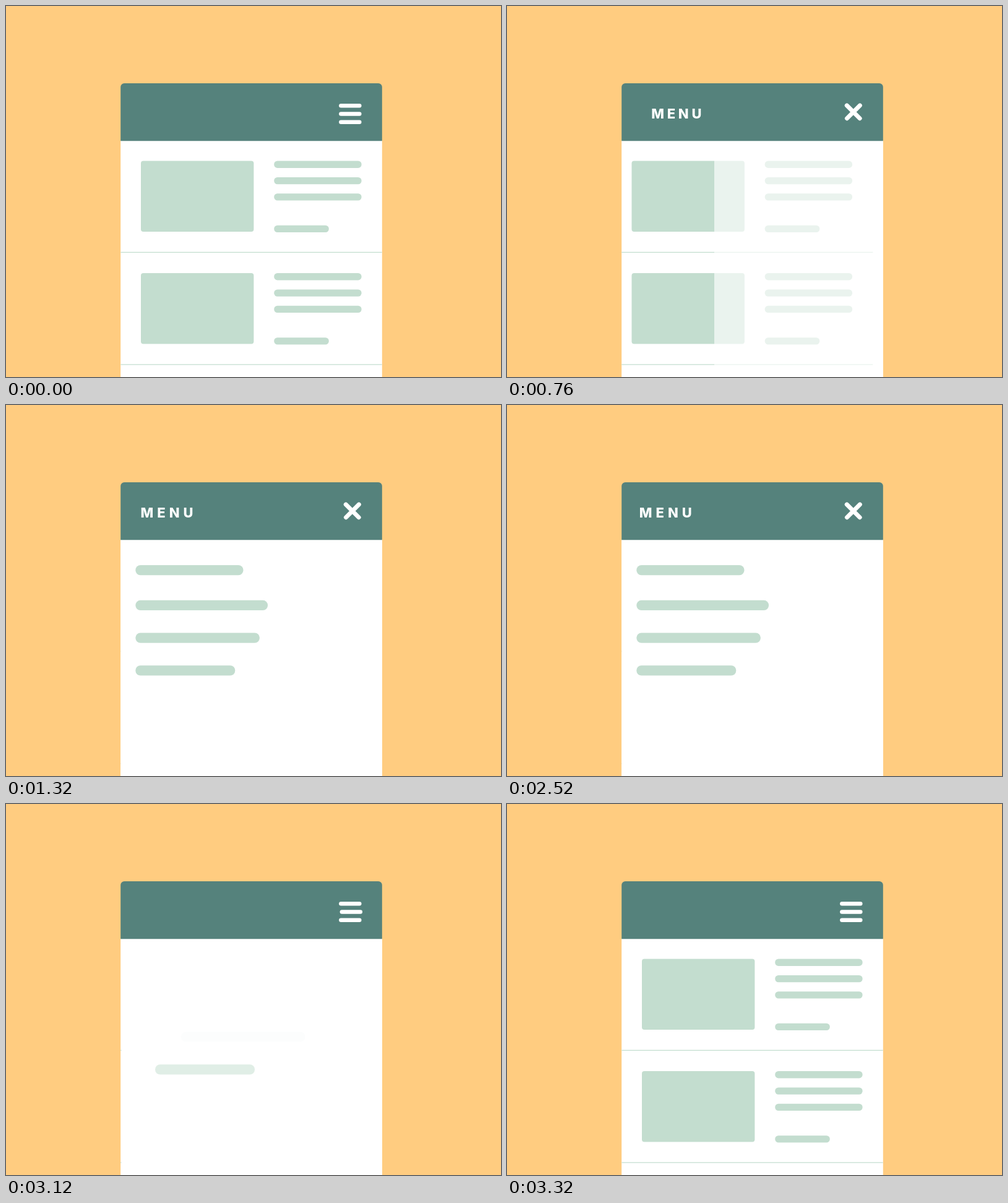
These frames come from a looping animation (800 px wide and 600 px high, 4800 ms). An HTML page with a canvas:

```html
<!DOCTYPE html>
<html lang="en">
<head>
<meta charset="utf-8">
<title>Menu transition</title>
<style>
  html, body { margin: 0; width: 100%; height: 100%; overflow: hidden; background: #ffcc80; }
  canvas { display: block; }
</style>
</head>
<body>
<canvas id="stage" width="800" height="600"></canvas>
<script>
const ctx = document.getElementById('stage').getContext('2d');
const LOOP = 4800, STEP = 40;
const TEAL = '#55827c', MINT = '#c3ddcf', WHITE = '#fff';
const CARD = { x: 185.2, y: 125, w: 422.6, headerEnd: 218.2 };

// Menu bars: [y, width]
const BARS = [[259, 174.2], [315.8, 213.8], [368.5, 200.6], [421.2, 161]];

const progress = (t, start, length) => Math.min(1, Math.max(0, (t - start) / length));
const inOut = u => u < .5 ? 4 * u ** 3 : 1 - 4 * (1 - u) ** 3;
const back = u => 2.5 * u ** 3 - 1.5 * u * u;

// 0 = away, 1 = in place; mirrored on the way out
function presence(t, start, length, outStart, outLength) {
  return t < outStart ? progress(t, start, length) : 1 - progress(t, outStart, outLength);
}

function box(x, y, w, h, r, color) {
  ctx.fillStyle = color;
  ctx.beginPath();
  ctx.roundRect(x, y, w, h, r);
  ctx.fill();
}

function faded(alpha, draw) {
  ctx.save();
  ctx.globalAlpha *= Math.min(1, Math.max(0, alpha));
  draw();
  ctx.restore();
}

function drawArticle(x, y) {
  box(x + 32.8, y + 32.3, 182.4, 114.4, 4, MINT);
  for (const dy of [32.3, 58.7, 85]) box(x + 248, y + dy, 141.4, 11.4, 5.5, MINT);
  box(x + 248, y + 136.5, 88.6, 11.4, 5.5, MINT);
  box(x, y + 179.6, CARD.w, 1.2, 0, MINT);
}

function drawContent(t) {
  const cover = inOut(presence(t, 586, 314, 3100, 220));
  ctx.save();
  ctx.beginPath();
  ctx.rect(CARD.x, CARD.headerEnd, CARD.w, 400);
  ctx.clip();
  for (const row of [0, 1]) drawArticle(CARD.x - 25.6 * cover, CARD.headerEnd + row * 181.5);
  faded(cover, () => box(CARD.x + CARD.w * (1 - cover), CARD.headerEnd, CARD.w, 400, 0, WHITE));
  ctx.restore();
}

function drawBars(t) {
  BARS.forEach(([y, w], i) => {
    const p = presence(t, 805 + 80 * i, 275, 2696 + 50 * i, 330);
    faded(3 * p, () => box(209.3 + 80 * back(1 - p), y, w, 16.3, 8, MINT));
  });
}

function drawTitle(t) {
  const p = presence(t, 658, 320, 2475, 320);
  const shift = 165 * back(1 - p);
  const spacing = 6 - Math.min(1.5, Math.max(0, shift * .08));
  faded(3.4 * p, () => {
    ctx.font = '800 22px Inter, sans-serif';
    ctx.letterSpacing = spacing + 'px';
    ctx.fillStyle = WHITE;
    ctx.fillText('MENU', 217.6 + shift, 182);
  });
}

function drawIcon(t) {
  const cross = inOut(presence(t, 420, 300, 2700, 340));
  for (const side of [-1, 1]) {
    ctx.save();
    ctx.translate(556.3 + 3.5 * cross, 174.5 + side * 13.3 * (1 - cross) - 3.3 * cross);
    ctx.rotate(-side * cross * Math.PI / 4);
    box(-18.2, -3.3, 36.4, 6.6 + .3 * cross, 3.3, WHITE);
    ctx.restore();
  }
  const gone = t < 2940 ? progress(t, 350, 240) : 1 - progress(t, 2940, 240);
  faded(1.15 - 1.15 * gone * gone, () => box(538.1 + 24 * gone * gone, 171.2, 36.4, 6.6, 3.3, WHITE));
}

function draw(t) {
  box(0, 0, 800, 600, 0, '#ffcc80');
  box(CARD.x, CARD.headerEnd - 1, CARD.w, 400, 0, WHITE);
  drawContent(t);
  drawBars(t);
  box(CARD.x, CARD.y, CARD.w, CARD.headerEnd - CARD.y, [6, 6, 0, 0], TEAL);
  drawTitle(t);
  drawIcon(t);
}

function tick(now) {
  draw(Math.floor(now % LOOP / STEP) * STEP);
  requestAnimationFrame(tick);
}
requestAnimationFrame(tick);
</script>
</body>
</html>
```
